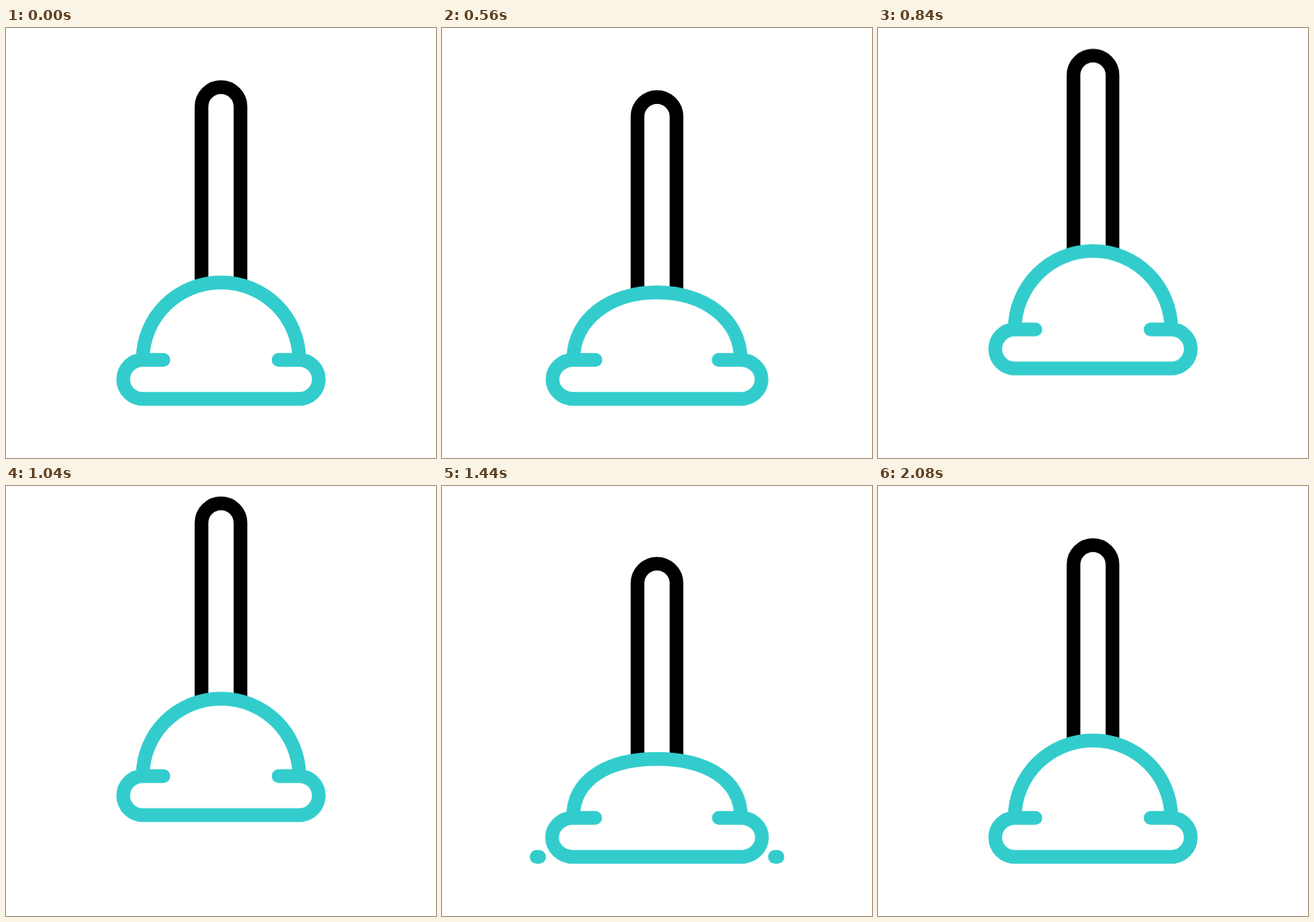
An HTML page without scripts that plays this animation: 640x640 px, repeating every 2.16 s.

```html
<!DOCTYPE html>
<html lang="en">
<head>
<meta charset="utf-8">
<title>Plunger</title>
<style>
  @property --head { syntax: "<length>"; inherits: false; initial-value: 0px; }
  @property --tail { syntax: "<length>"; inherits: false; initial-value: 0px; }

  html, body { margin: 0; width: 100%; height: 100%; overflow: hidden; background: #fff; }
  svg { display: block; width: 100vw; height: 100vh; }
  path {
    fill: none; stroke: #3cc; stroke-width: 20.4; stroke-linecap: round;
    vector-effect: non-scaling-stroke;
  }
  .jump, .cup, .handle, .dome, .dash {
    animation: 2.16s cubic-bezier(.33, 0, .6, 1) infinite;
  }

  /* handle and dome share one squash: each has a rest, a flat and a tall shape */
  .handle, .dome { animation-name: squash; d: var(--rest); }
  .handle {
    --rest: path("M-29 381V117a29 29 0 0 1 58 0V381");
    --flat: path("M-29 409V145a29 29 0 0 1 58 0V409");
    --tall: path("M-29 378.5V114.5a29 29 0 0 1 58 0V378.5");
    stroke: #000; stroke-linecap: butt;
  }
  .dome {
    --rest: path("M-116.5 494C-116.5 430-64.3 378.7 0 378.7S116.5 430 116.5 494");
    --flat: path("M-116.5 494C-116.5 434-64.3 406.7 0 406.7S116.5 434 116.5 494");
    --tall: path("M-116.5 494C-116.5 430-64.3 376.2 0 376.2S116.5 430 116.5 494");
  }
  @keyframes squash {
    0%, 7.4%, 48.1%, 85.2%, 100% { d: var(--rest); }
    20.4%, 67.6% { d: var(--flat); }
    33.3% { d: var(--tall); }
    60.2% { d: var(--rest); animation-timing-function: cubic-bezier(.3, .3, .5, 1); }
  }

  .cup { animation-name: widen; }
  @keyframes widen {
    0%, 7.4%, 33.3%, 96.3%, 100% { transform: scaleX(1); }
    24.6% { transform: scaleX(1.0745); }
    61.1% { transform: scaleX(1); animation-timing-function: cubic-bezier(.3, .3, .4, 1); }
    67.6% { transform: scaleX(1.0745); animation-timing-function: cubic-bezier(.33, 0, .4, 1); }
  }

  .jump { animation-name: jump; }
  @keyframes jump {
    0%, 61.1%, 100% { transform: translateY(0); }
    26.04% { transform: translateY(0); animation-timing-function: cubic-bezier(.33, 0, .5, 1); }
    48.15% { transform: translateY(-62.2px); animation-timing-function: cubic-bezier(.333, 0, .667, .45); }
  }

  /* the dash runs outwards: its head leaves first, its tail catches up */
  .dash {
    animation-name: head, tail, show;
    stroke-dasharray: calc(var(--head) - var(--tail)) 999px;
    stroke-dashoffset: calc(-1 * var(--tail));
  }
  @keyframes head { 0%, 64.8% { --head: 0px; } 81.5%, 100% { --head: 97px; } }
  @keyframes tail { 0%, 70.4% { --tail: 0px; } 87%, 100% { --tail: 97px; } }
  @keyframes show {
    0%, 87%, 100% { opacity: 0; animation-timing-function: step-end; }
    65.7% { opacity: 1; animation-timing-function: step-end; }
  }
</style>
</head>
<body>
<svg viewBox="0 0 640 640">
  <g transform="translate(320 0)">
    <g class="jump">
      <path class="handle"/>
      <g class="cup">
        <path class="dome"/>
        <path d="M-85.7 494H-116.5a29 29 0 0 0 0 58H116.5a29 29 0 0 0 0-58H85.7"/>
      </g>
    </g>
    <path class="dash" d="M-175.5 552h-97.1"/>
    <path class="dash" d="M175.5 552h97.1"/>
  </g>
</svg>
</body>
</html>
```
